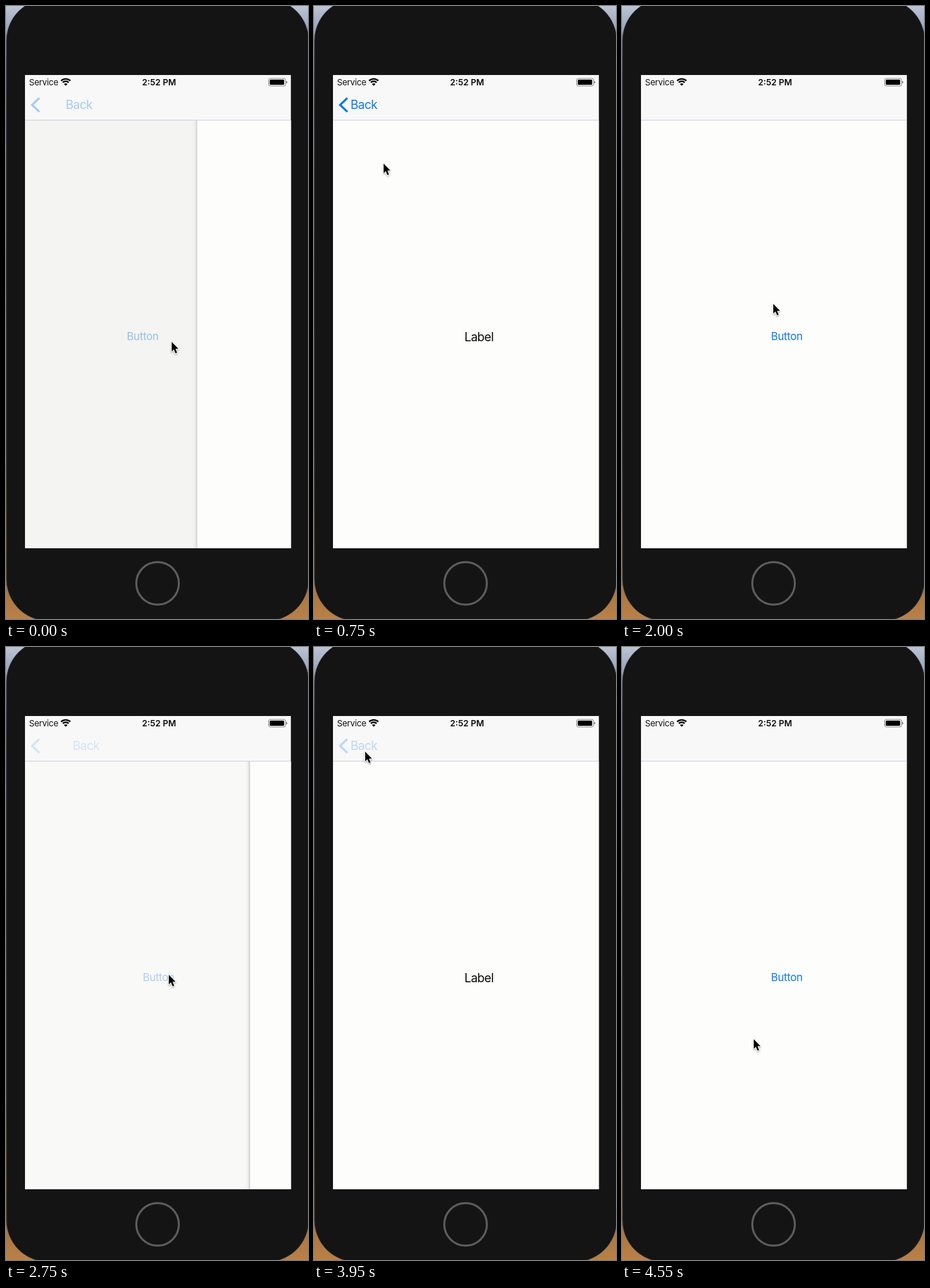
Write an HTML page with a canvas that moves like this. It is 525 by 1066 pixels and loops after 4800 ms.

```html
<!DOCTYPE html>
<html lang="en">
<head>
<meta charset="utf-8">
<title>Navigation push and pop</title>
<style>
html, body { margin: 0; width: 100%; height: 100%; overflow: hidden; background: #141414; }
canvas { display: block; width: 525px; height: 1066px; }
</style>
</head>
<body>
<canvas id="stage" width="525" height="1066"></canvas>
<script>
const ctx = document.getElementById('stage').getContext('2d');
const LOOP = 4800, STEP = 50;
const SCREEN = { x: 33, y: 120, w: 462.5, h: 823 };
const CONTENT_TOP = 199;
const BLUE = '#0f78ee', PAGE = '#fdfdfc';

const transitions = [
  { start: -68, push: true },
  { start: 1449, push: false },
  { start: 2712, push: true },
  { start: 4030, push: false }
];
const backPresses = [1300, 3900];
const buttonPress = 2600;

// time, x, y of the pointer tip
const pointerPath = [
  [0, 288, 584], [250, 288, 584], [750, 121, 274], [1000, 89, 167],
  [1600, 89, 167], [2000, 263, 518], [2250, 283, 570], [2750, 283, 570],
  [2950, 259, 469], [3350, 143, 280], [3650, 93, 170], [3850, 89, 182],
  [4100, 89, 182], [4400, 229, 682], [LOOP, 229, 682]
];

const clamp = v => Math.max(0, Math.min(1, v));
const mix = (a, b, k) => a + (b - a) * k;

// Critically damped spring: share of the distance still to go.
function remaining(ms) {
  if (ms >= 540) return 0;
  const wt = Math.sqrt(1000 / 3) * ms / 1000;
  return (1 + wt) * Math.exp(-wt);
}

function pointerAt(t) {
  const i = pointerPath.findIndex(p => p[0] > t);
  const a = pointerPath[i - 1], b = pointerPath[i];
  const k = (t - a[0]) / (b[0] - a[0]);
  const e = k * k * (3 - 2 * k);
  return [mix(a[1], b[1], e), mix(a[2], b[2], e)];
}

function text(str, x, y, size, color, { alpha = 1, weight = 400, spacing = 0 } = {}) {
  ctx.save();
  ctx.globalAlpha *= alpha;
  ctx.font = `${weight} ${size}px Inter, Roboto, sans-serif`;
  ctx.letterSpacing = spacing + 'px';
  ctx.fillStyle = color;
  ctx.fillText(str, x, y);
  ctx.restore();
}

function rect(x, y, w, h, color) {
  ctx.fillStyle = color;
  ctx.fillRect(x, y, w, h);
}

function path(points, close) {
  ctx.beginPath();
  points.forEach(([x, y]) => ctx.lineTo(x, y));
  if (close) ctx.closePath();
}

function drawDevice() {
  const back = ctx.createLinearGradient(0, 0, 0, 1066);
  [[0, '#bac4d3'], [.05, '#8e9ab5'], [.12, '#48536f'], [.3, '#343a4c'],
   [.42, '#29251f'], [.7, '#4b351f'], [.92, '#a06d3b'], [1, '#b98148']]
    .forEach(([at, color]) => back.addColorStop(at, color));
  rect(0, 0, 525, 1066, back);
  ctx.beginPath();
  ctx.roundRect(1, -12, 525, 1081, 72);
  ctx.fillStyle = '#141414';
  ctx.fill();
  ctx.lineWidth = 1;
  ctx.strokeStyle = '#34353a';
  ctx.stroke();
  ctx.beginPath();
  ctx.arc(263.5, 1004, 37, 0, Math.PI * 2);
  ctx.lineWidth = 3.5;
  ctx.strokeStyle = '#5d5d5d';
  ctx.stroke();
}

function drawStatus() {
  text('Service', 40, 138, 14.8, '#111', { spacing: -.3 });
  text('2:52 PM', 236.5, 138, 14.8, '#0b0b0b', { weight: 600 });
  ctx.lineWidth = 2.6;
  ctx.strokeStyle = '#000';
  for (const r of [11.3, 7.1]) {
    ctx.beginPath();
    ctx.arc(103.8, 138, r, -Math.PI * .75, -Math.PI * .25);
    ctx.stroke();
  }
  ctx.beginPath();
  ctx.moveTo(103.8, 138.8);
  ctx.arc(103.8, 138.8, 4.3, -Math.PI * .75, -Math.PI * .25);
  ctx.fillStyle = '#000';
  ctx.fill();
  ctx.beginPath();
  ctx.roundRect(456.5, 126, 29.5, 13, 3);
  ctx.lineWidth = 1;
  ctx.strokeStyle = '#777';
  ctx.stroke();
  ctx.beginPath();
  ctx.roundRect(458.5, 128, 25, 9, 1.5);
  ctx.fill();
  ctx.beginPath();
  ctx.arc(487, 132.5, 2, -Math.PI / 2, Math.PI / 2);
  ctx.fillStyle = '#777';
  ctx.fill();
}

function drawBack(shift, chevronAlpha, titleAlpha) {
  ctx.save();
  ctx.globalAlpha = chevronAlpha;
  path([[58, 160], [45.5, 172], [58, 184]]);
  ctx.lineWidth = 3.8;
  ctx.strokeStyle = BLUE;
  ctx.stroke();
  ctx.restore();
  text('Back', 63.5 + shift, 179.3, 21, BLUE, { alpha: titleAlpha, spacing: -.65 });
}

function drawContent(cover, buttonAlpha) {
  const { x, w, y, h } = SCREEN;
  const bottom = y + h, height = bottom - CONTENT_TOP;
  const edge = x + w * (1 - cover);
  rect(x, CONTENT_TOP, w, height, PAGE);
  text('Button', 259 - .3 * w * cover, 581.4, 18.5, BLUE, { alpha: buttonAlpha, spacing: -.35 });
  if (cover <= .001) return;
  rect(x, CONTENT_TOP, w, height, `rgba(0,0,0,${.1 * cover})`);
  const shade = ctx.createLinearGradient(edge - 10, 0, edge, 0);
  shade.addColorStop(0, 'rgba(0,0,0,0)');
  shade.addColorStop(.6, `rgba(0,0,0,${.04 * (1 - cover)})`);
  shade.addColorStop(1, `rgba(0,0,0,${.24 * (1 - cover)})`);
  rect(edge - 10, CONTENT_TOP, 10, height, shade);
  rect(edge, CONTENT_TOP, w, height, PAGE);
  text('Label', 261.5 + edge - x, 582.6, 21, '#0a0a0a', { spacing: -.65 });
}

function drawPointer(x, y) {
  ctx.save();
  ctx.translate(x, y);
  path([[0, 0], [0, 16.8], [3.8, 13.3], [6.7, 20], [9.4, 18.8], [6.6, 12.3], [11.7, 12]], true);
  ctx.shadowColor = 'rgba(0,0,0,.35)';
  ctx.shadowBlur = 3;
  ctx.shadowOffsetY = 1.5;
  ctx.lineWidth = 2;
  ctx.lineJoin = 'round';
  ctx.strokeStyle = '#fff';
  ctx.stroke();
  ctx.shadowColor = 'transparent';
  ctx.fillStyle = '#000';
  ctx.fill();
  ctx.restore();
}

function draw(t) {
  const move = transitions.filter(m => m.start <= t).pop();
  const age = t - move.start;
  const rest = remaining(age);
  const cover = move.push ? 1 - rest : rest;
  const nextPop = transitions.find(m => !m.push && m.start > t);
  const pressed = move.push && nextPop && backPresses.some(p => p <= t && nextPop.start - p < 200);

  let buttonAlpha = 1;
  if (move.push) buttonAlpha = mix(.2, 1, clamp(age / 250));
  else if (t >= buttonPress && t < transitions[2].start) buttonAlpha = .2;

  drawDevice();
  ctx.save();
  ctx.beginPath();
  ctx.rect(SCREEN.x, SCREEN.y, SCREEN.w, SCREEN.h);
  ctx.clip();
  drawContent(cover, buttonAlpha);
  rect(SCREEN.x, SCREEN.y, SCREEN.w, CONTENT_TOP - SCREEN.y, '#f8f8f8');
  rect(SCREEN.x, CONTENT_TOP - 1, SCREEN.w, 1, '#c9c7de');
  drawStatus();
  if (move.push) {
    const alpha = pressed ? .26 : cover;
    drawBack(62 * rest, alpha, alpha);
  } else if (rest > .002) {
    drawBack(49 * (1 - rest), Math.min(.3, rest * .7), Math.min(.28, rest * .6));
  }
  ctx.restore();
  drawPointer(...pointerAt(t));
}

const begun = performance.now();
function tick() {
  const t = (performance.now() - begun) % LOOP;
  draw(Math.floor(t / STEP) * STEP);
  requestAnimationFrame(tick);
}
tick();
</script>
</body>
</html>
```
